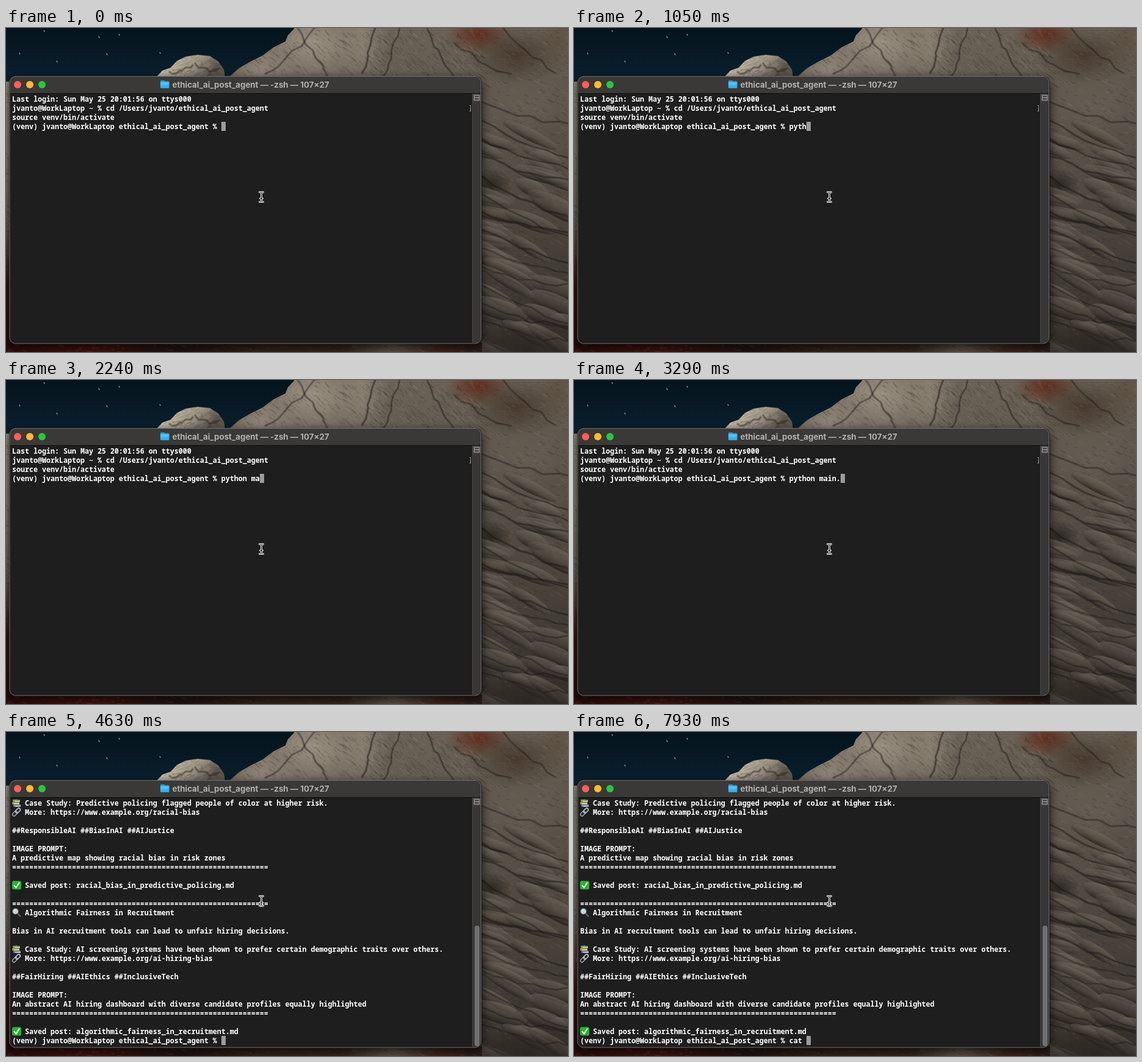
An HTML page with a canvas for the animation above (8000 ms loop, 921x532 px).

```html
<!DOCTYPE html>
<html lang="en">
<head>
<meta charset="utf-8">
<title>Terminal session</title>
<style>
  html, body { margin: 0; width: 100%; height: 100%; overflow: hidden; background: #06141e; }
  canvas { display: block; }
</style>
</head>
<body>
<canvas id="stage" width="921" height="532"></canvas>
<script>
const W = 921, H = 532, LOOP = 8000;
const ENTER = 4480, OUTPUT = 4630;
const CELL = 7, ROW = 15, LEFT = 10, TOP = 109;
const MONO = '600 11.667px "Noto Sans Mono", "DejaVu Sans Mono", monospace';

const PROMPT = '(venv) jvanto@WorkLaptop ethical_ai_post_agent % ';
const RULE = '='.repeat(60);
const login = [
  'Last login: Sun May 25 20:01:56 on ttys000',
  'jvanto@WorkLaptop ~ % cd /Users/jvanto/ethical_ai_post_agent',
  'source venv/bin/activate',
];
const report = [
  '📚 Case Study: Predictive policing flagged people of color at higher risk.',
  '🔗 More: https://www.example.org/racial-bias',
  '',
  '##ResponsibleAI ##BiasInAI ##AIJustice',
  '',
  'IMAGE PROMPT:',
  'A predictive map showing racial bias in risk zones',
  RULE,
  '',
  '✅ Saved post: racial_bias_in_predictive_policing.md',
  '',
  RULE,
  '🔍 Algorithmic Fairness in Recruitment',
  '',
  'Bias in AI recruitment tools can lead to unfair hiring decisions.',
  '',
  '📚 Case Study: AI screening systems have been shown to prefer certain demographic traits over others.',
  '🔗 More: https://www.example.org/ai-hiring-bias',
  '',
  '##FairHiring ##AIEthics ##InclusiveTech',
  '',
  'IMAGE PROMPT:',
  'An abstract AI hiring dashboard with diverse candidate profiles equally highlighted',
  RULE,
  '',
  '✅ Saved post: algorithmic_fairness_in_recruitment.md',
];
const runKeys = [300, 600, 900, 1050, 1340, 1490, 1790, 2090, 2240, 2540, 2690, 3290, 3580, 3880];
const catKeys = [7330, 7480, 7780, 7930];
const typed = (text, keys, t) => text.slice(0, keys.filter(k => k <= t).length);

const stage = document.getElementById('stage').getContext('2d');
let g = stage;

let seed = 11;
function rand(a = 0, b = 1) {
  seed = (seed * 1664525 + 1013904223) % 4294967296;
  return a + (b - a) * seed / 4294967296;
}

// Drawing helpers
function box(x, y, w, h, fill, r = 0) {
  g.fillStyle = fill;
  g.beginPath();
  g.roundRect(x, y, w, h, r);
  g.fill();
}
function disc(x, y, r, fill) {
  g.fillStyle = fill;
  g.beginPath();
  g.arc(x, y, r, 0, 7);
  g.fill();
}
function stroke(d, color, width, cap = 'round') {
  g.strokeStyle = color;
  g.lineWidth = width;
  g.lineCap = cap;
  g.stroke(new Path2D(d));
}
function glow(x, y, rx, ry, color) {
  g.save();
  g.translate(x, y);
  g.scale(rx, ry);
  const grad = g.createRadialGradient(0, 0, 0, 0, 0, 1);
  grad.addColorStop(0, color + 'd0');
  grad.addColorStop(1, color + '00');
  g.fillStyle = grad;
  g.fillRect(-1, -1, 2, 2);
  g.restore();
}
function fade(x0, y0, x1, y1, ...colors) {
  const grad = g.createLinearGradient(x0, y0, x1, y1);
  colors.forEach((c, i) => grad.addColorStop(i / (colors.length - 1), c));
  return grad;
}
function crack(x0, y0, x1, y1, width) {
  let line = `M${x0} ${y0}`;
  for (let i = 1; i <= 7; i++) {
    const u = i / 7, sag = 6 * Math.sin(u * Math.PI);
    line += `L${x0 + (x1 - x0) * u + rand(-3, 3)} ${y0 + (y1 - y0) * u + sag + rand(-4, 4)}`;
  }
  stroke(line, '#1d1a1738', width + 3);
  stroke(line, '#1d1a1790', width);
}
function slab(x, y, rx, ry, tilt) {
  g.save();
  g.translate(x, y);
  g.rotate(tilt);
  g.fillStyle = fade(0, -ry, 0, ry, '#776e6190', '#57504770', '#1c1916c0');
  g.beginPath();
  g.ellipse(0, 0, rx, ry, 0, 0, 7);
  g.fill();
  g.restore();
}
function grain(count, x0, y0, x1, y1, slope) {
  for (let i = 0; i < count; i++) {
    const x = rand(x0, x1), y = rand(y0, y1), len = rand(1, 9);
    const shade = rand() < .6 ? '#1c181428' : '#b8ae9e1c';
    stroke(`M${x} ${y}l${len} ${len * slope + rand(-2, 2)}`, shade, rand(.6, 2));
  }
}

function drawDesktop() {
  g.fillStyle = fade(0, 0, 0, 80, '#05131d', '#0a1f2d');
  g.fillRect(0, 0, W, H);
  for (const [x, y] of [[83, 54], [152, 14], [185, 10], [165, 42], [22, 41], [62, 4], [252, 40]])
    stroke(`M${x} ${y}l1 2`, '#a59c8c', 1.3);

  // Small dome behind the window
  g.save();
  g.clip(new Path2D('M247 80L256 70 270 65 280 54 294 47 314 44 334 46 348 55 357 68 359 80Z'));
  box(240, 40, 130, 45, fade(285, 44, 325, 84, '#bdb3a2', '#9c9282', '#5d564c'));
  grain(220, 245, 44, 360, 80, -.4);
  crack(268, 72, 305, 60, 1);
  crack(310, 58, 350, 70, 1);
  g.restore();

  // Large cliff
  g.save();
  g.clip(new Path2D('M473 0L462 12 458 22 438 32 421 45 399 56 382 66 366 80V532H921V0Z'));
  box(360, 0, 561, H, fade(620, 0, 720, 532, '#6b6357', '#5c554b', '#4b453d', '#37322c'));
  glow(500, 25, 110, 75, '#a4998a');
  glow(415, 70, 60, 40, '#988e7f');
  glow(585, 20, 45, 80, '#8d8374');
  glow(650, 75, 60, 60, '#655d52');
  glow(775, 10, 55, 34, '#5e2212');
  glow(835, 45, 80, 50, '#423226');
  glow(905, 20, 40, 50, '#5c4e40');
  glow(850, 125, 90, 50, '#655e53');
  glow(795, 258, 36, 28, '#221e1b');
  grain(900, 380, 0, 780, 80, .9);
  grain(900, 770, 0, 921, 532, .5);
  crack(478, 0, 530, 80, 1);
  crack(505, 0, 425, 78, 1);
  crack(605, 0, 582, 78, 1.5);
  crack(645, 0, 620, 76, 1);
  crack(690, 0, 735, 80, 1);
  crack(735, 25, 830, 78, 1);
  crack(815, 0, 900, 70, 1);
  for (let y = 175; y < 540; y += 11)
    slab(rand(780, 921), y, rand(28, 60), rand(9, 17), rand(.2, .6));
  for (let y = 120; y < 530; y += 30)
    crack(776, y, 925, y + rand(30, 75), rand(.8, 1.8));
  glow(850, 530, 120, 45, '#29241f');
  g.restore();

  // Slivers visible beside and below the window
  box(0, 88, 8, 444, fade(0, 88, 0, 532, '#938a7b', '#8a8173', '#6f675b', '#3b100a', '#260b08'));
  box(0, 516, 560, 16, fade(0, 0, 560, 0, '#2b0b08', '#42130c', '#1d1411', '#35211b', '#33261f'));
  box(560, 516, 220, 16, fade(560, 0, 780, 0, '#332a23', '#5b5349', '#41251c', '#2c1c16'));
  grain(180, 0, 518, 780, 532, .2);
  grain(140, 0, 90, 6, 400, .4);
}

function drawFrame() {
  g.save();
  g.shadowColor = '#000b';
  g.shadowBlur = 16;
  g.shadowOffsetY = 5;
  box(5, 79, 775, 440, '#111', 10);
  g.restore();
  box(6, 80, 773, 438, '#1e1e1e', 9);
  box(6, 80, 773, 27, '#3b3937', [9, 9, 0, 0]);
  box(6, 107, 773, 1, '#0c0c0c');
  box(764, 108, 14, 409, '#383735', [0, 0, 8, 0]);
  box(764, 108, 1, 409, '#4a4947');
  g.strokeStyle = '#71706e';
  g.lineWidth = 1;
  g.beginPath();
  g.roundRect(6, 79.5, 772.5, 438.5, 9.5);
  g.stroke();

  ['#ff5f57', '#febc2e', '#28c840'].forEach((c, i) => disc(19 + 20 * i, 93, 6, c));

  box(253, 86, 7, 4, '#1591ce', 1);
  box(253, 87.5, 14.5, 11.5, fade(0, 88, 0, 99, '#62d0fb', '#27a5e4'), 1.5);
  box(253, 88, 14.5, 1, '#1b94d0');

  g.fillStyle = '#b3b1af';
  g.font = '700 13.3px Inter, "Open Sans", sans-serif';
  g.textAlign = 'center';
  g.fillText('ethical_ai_post_agent — -zsh — 107×27', 401, 97.5);
  g.textAlign = 'left';

  box(765, 108, 13, 13, '#4c4b49');
  stroke('M767.5 110.5h8v8h-8zM767.5 114.5h8', '#a3a2a0', 1, 'butt');
}

// Icons sit in a 14 by 15 area whose corner is the origin
const icons = {
  '📚'() {
    [['#4f9a58', 1, 2], ['#c9813c', 0, 6], ['#5485a8', 2, 10]].forEach(([c, x, y]) => {
      box(x, y, 12, 4, c, 1);
      box(x + 3, y + 2, 9, 1.3, '#e8e2d2');
    });
    stroke('M2 3l6-1', '#82bd7d', 1);
  },
  '🔗'() {
    g.translate(7, 7.5);
    g.rotate(-Math.PI / 4);
    for (const [x, c] of [[-8, '#8f989f'], [-1, '#c3c9cd']]) {
      g.strokeStyle = c;
      g.lineWidth = 1.6;
      g.beginPath();
      g.roundRect(x, -2.5, 9, 5, 2.5);
      g.stroke();
    }
  },
  '✅'() {
    box(0, 0.5, 15, 14, '#20b62c', 2.5);
    stroke('M3.5 8l3 3.5L11.5 3.5', '#fff', 2);
  },
  '🔍'() {
    stroke('M9 9l4.5 4.5', '#55504d', 2.6);
    disc(5.5, 5.5, 5, '#8f999f');
    disc(5.5, 5.5, 3.9, '#c4d8e0');
    stroke('M3.5 5q.4-2 2-2', '#f5fafc', 1);
  },
};

function printLine(line, row) {
  const y = TOP + row * ROW, mark = [...line][0];
  if (icons[mark]) {
    g.save();
    g.translate(LEFT, y);
    icons[mark]();
    g.restore();
    line = line.replace(mark, '  ');
  }
  g.fillStyle = '#fff';
  g.font = MONO;
  g.fillText(line, LEFT, y + 12);
}
function block(column, row) {
  box(LEFT + column * CELL, TOP + row * ROW, CELL, ROW, '#9c9c9c');
}
function bracket(x, row, dir) {
  stroke(`M${x} ${TOP + row * ROW + 3.5}h${2 * dir}v9h${-2 * dir}`, '#a0a0a0', 1, 'butt');
}
function pointer() {
  const beam = 'M415.5 269.5h1.5l1.5 1.5 1.5-1.5h1.5M418.5 271v13M415.5 285.5h1.5l1.5-1.5 1.5 1.5h1.5M416.5 280h4';
  stroke(beam, '#fff', 2.8);
  stroke(beam, '#151515', 1);
}

function drawSession(t) {
  let lines;
  if (t < OUTPUT) {
    lines = [...login, PROMPT + typed('python main.py', runKeys, t)];
    bracket(759.5, 1, 1);
    if (t >= ENTER) {
      bracket(9.5, 3, -1);
      bracket(759.5, 3, 1);
      lines.push('');
    }
  } else {
    lines = [...report, PROMPT + typed('cat ', catKeys, t)];
    box(768, 318, 8, 198, '#707070', 4);
  }
  lines.forEach(printLine);
  const row = lines.length - 1;
  block(lines[row].length, row);
  pointer();
}

const backdrop = document.createElement('canvas');
backdrop.width = W;
backdrop.height = H;
g = backdrop.getContext('2d');
drawDesktop();
drawFrame();
g = stage;

function tick() {
  g.drawImage(backdrop, 0, 0);
  drawSession(performance.now() % LOOP);
  requestAnimationFrame(tick);
}
tick();
</script>
</body>
</html>
```
